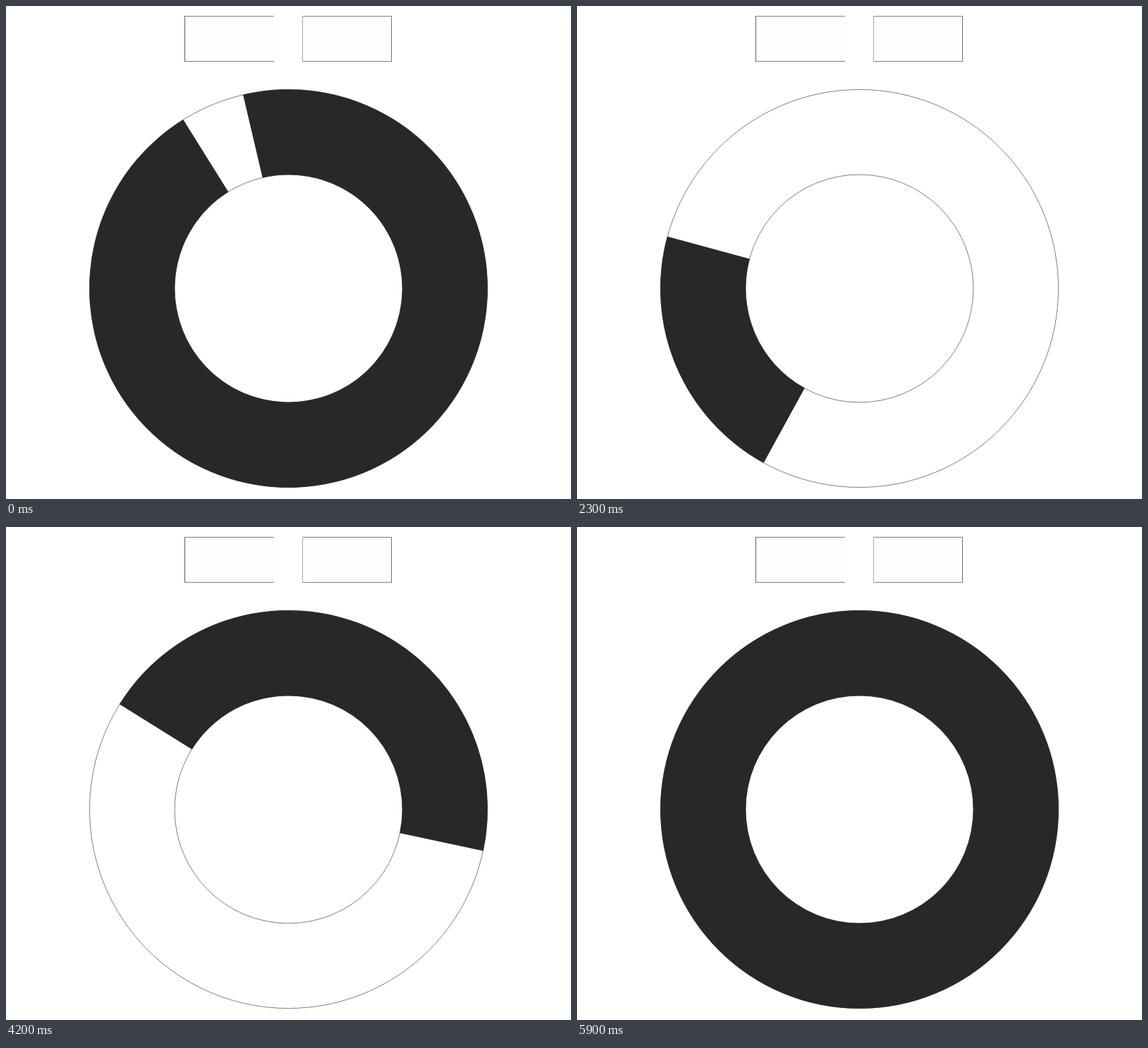
An HTML page with a canvas that plays this animation: 801x699 px, repeating every 6000 ms.

```html
<!DOCTYPE html>
<html lang="en">
<head>
<meta charset="utf-8">
<title>Ring loader</title>
<style>
  html, body { margin: 0; width: 100%; height: 100%; overflow: hidden; background: #fff; }
  canvas { display: block; }
</style>
</head>
<body>
<canvas id="stage" width="801" height="699"></canvas>
<script>
const ctx = document.getElementById('stage').getContext('2d');
const TURN = Math.PI * 2;
const CENTER = 400.5, OUTER = 282.3, INNER = 161.3;
const LOOP = 6000, STEP = 100;
const DARK = '#282828';

function bar(x, y, w, h, color) {
  ctx.fillStyle = color;
  ctx.fillRect(x, y, w, h);
}

function drawBoxes() {
  for (const x of [253, 420]) {
    bar(x, 14, 127, 65, '#fdfdfd');
    bar(x, 14, 127, 1, '#808080');
    bar(x, 78, 127, 1, '#808080');
  }
  bar(253, 14, 1, 65, '#606060');
  bar(420, 14, 1, 65, '#a8a8a8');
  bar(546, 14, 1, 65, '#707070');
}

function circle(radius) {
  ctx.beginPath();
  ctx.arc(CENTER, CENTER, radius, 0, TURN);
  ctx.stroke();
}

// Angles are in turns, clockwise from the top.
function sector(from, to) {
  const a = (from - 0.25) * TURN, b = (to - 0.25) * TURN;
  ctx.beginPath();
  ctx.arc(CENTER, CENTER, OUTER, a, b);
  ctx.arc(CENTER, CENTER, INNER, b, a, true);
  ctx.closePath();
  ctx.fill();
}

function draw(time) {
  const progress = (Math.floor(time % LOOP / STEP) + 1) * STEP / LOOP;
  const rise = Math.min(1, progress * 2);
  const fall = Math.max(0, progress * 2 - 1);
  const gapStart = 0.02 + 0.98 * fall;
  const gapEnd = 0.04 + 0.96 * rise;
  const spin = -progress;

  bar(0, 0, 801, 699, '#fff');
  drawBoxes();
  ctx.strokeStyle = DARK;
  ctx.lineWidth = 0.6;
  circle(OUTER - 0.3);
  circle(INNER + 0.2);
  ctx.fillStyle = DARK;
  sector(spin - gapStart, spin + 1 - gapEnd);
}

function frame() {
  draw(performance.now());
  requestAnimationFrame(frame);
}
frame();
</script>
</body>
</html>
```
